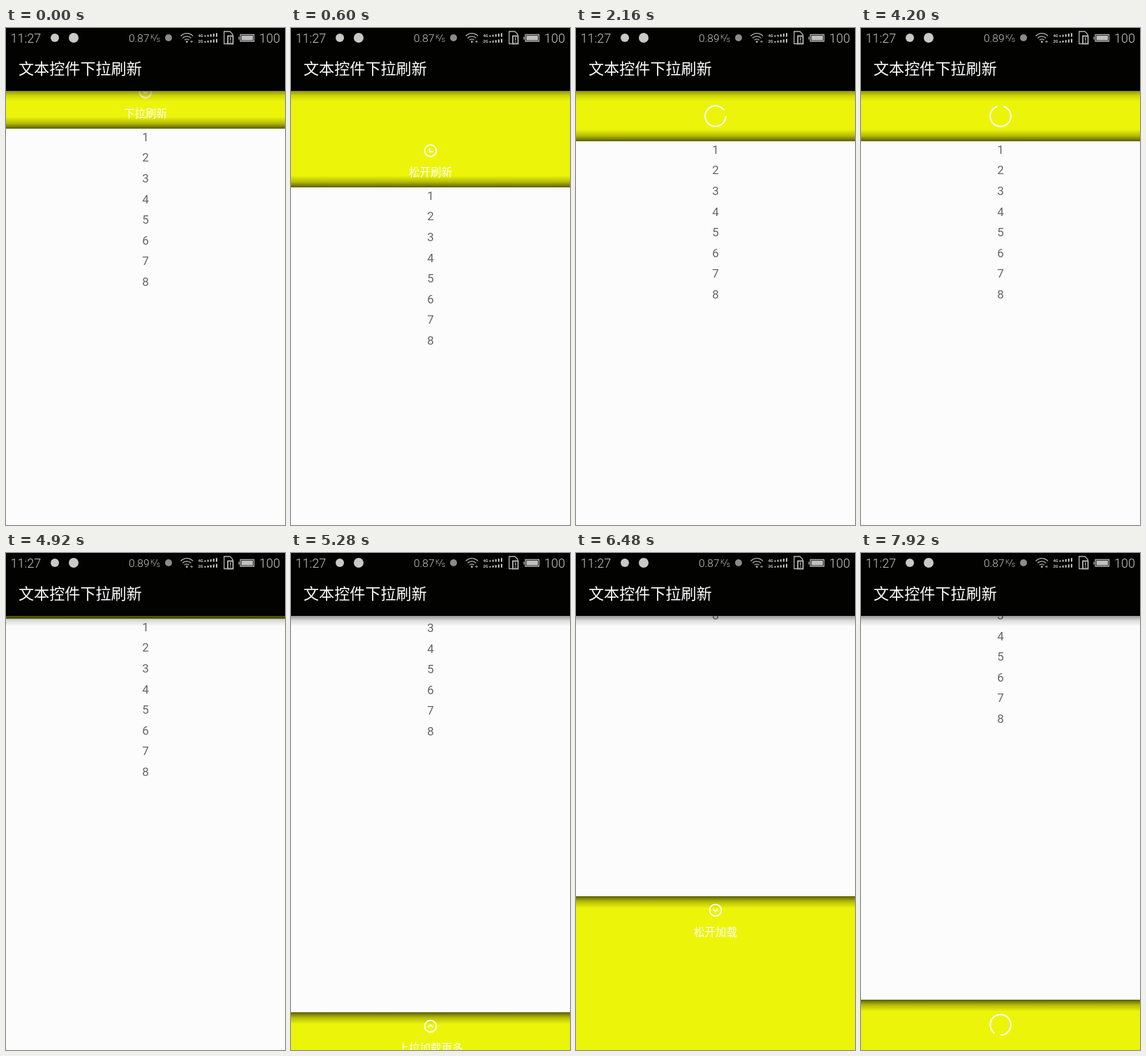
Animation, 400 px wide and 711 px high, one loop 8000 ms. Source, as an HTML page:

```html
<!DOCTYPE html>
<html lang="zh-CN">
<head>
<meta charset="utf-8">
<title>下拉刷新</title>
<style>
  html, body { margin: 0; width: 100%; height: 100%; overflow: hidden; background: #fcfcfc; }
  svg { display: block; width: 100vw; height: 100vh; }
  text { font-family: Roboto, "Noto Sans CJK SC", "Noto Sans CJK", sans-serif; }
  .status { fill: #c9c9c9; font-weight: 300; }
  .line { fill: none; stroke: #b4b4b4; stroke-width: 1.3; }
  .hint { fill: #fff; font-size: 15.5px; text-anchor: middle; }
  .ring { fill: none; stroke: #fff; stroke-width: 1.8; }
  .number { fill: #666; font-size: 17px; text-anchor: middle; }
</style>
</head>
<body>
<svg viewBox="0 0 400 711" preserveAspectRatio="none">
  <defs>
    <linearGradient id="shade" x1="0" y1="0" x2="0" y2="1">
      <stop offset="0" stop-opacity=".62"/>
      <stop offset=".45" stop-opacity=".24"/>
      <stop offset="1" stop-opacity="0"/>
    </linearGradient>
    <linearGradient id="barShade" x1="0" y1="0" x2="0" y2="1">
      <stop offset="0" stop-opacity=".4"/>
      <stop offset=".45" stop-opacity=".13"/>
      <stop offset="1" stop-opacity="0"/>
    </linearGradient>
    <g id="arrow" class="ring">
      <circle r="8.4"/>
      <path d="M-3.6-1.6 0 2 3.6-1.6"/>
    </g>
    <circle id="spinner" class="ring" r="14.8" pathLength="360" stroke-dasharray="324 36" stroke-dashoffset="-18" style="stroke-width:2"/>
  </defs>

  <rect y="90" width="400" height="621" fill="#ecf509"/>
  <g id="page">
    <rect y="90" width="400" height="621" fill="#fcfcfc"/>
    <rect width="400" height="17" fill="url(#shade)" transform="translate(0 90) scale(1 -1)"/>
    <rect y="711" width="400" height="17" fill="url(#shade)"/>
    <g id="numbers"></g>
    <g id="header">
      <g class="idle">
        <g transform="translate(200 37.5)"><use class="turn" href="#arrow"/></g>
        <text class="hint" x="200" y="74"></text>
      </g>
      <g transform="translate(200 54)"><use class="spin" href="#spinner"/></g>
    </g>
    <g id="footer">
      <g class="idle">
        <g transform="translate(200 731)"><use class="turn" href="#arrow"/></g>
        <text class="hint" x="200" y="767.5"></text>
      </g>
      <g transform="translate(200 747)"><use class="spin" href="#spinner"/></g>
    </g>
  </g>
  <rect y="90" width="400" height="15" fill="url(#barShade)"/>

  <rect width="400" height="90" fill="#020200"/>
  <text x="18" y="66.3" font-size="22.1" fill="#fff">文本控件下拉刷新</text>

  <g class="status">
    <text x="6.5" y="21" font-size="18">11:27</text>
    <circle cx="70" cy="14" r="6"/>
    <circle cx="97" cy="14" r="7"/>
    <text id="speed" x="176" y="20" font-size="15.5"></text>
    <text x="207" y="15.5" font-size="9.5">K</text>
    <path class="line" d="M212 19 217 9" style="stroke-width:.9"/>
    <text x="215.7" y="20" font-size="10.5">s</text>
    <circle cx="233" cy="14" r="5" fill="#8c8c8c"/>
    <text x="363" y="21" font-size="18">100</text>
  </g>
  <g class="line">
    <path d="M250.5 11.5a12 12 0 0 1 17.5 0M253.3 14.5a8 8 0 0 1 12 0M256 17.3a4.6 4.6 0 0 1 6.6 0"/>
    <path d="M264 19.5h4M266 17.5v4" style="stroke-width:.8"/>
    <circle cx="259.3" cy="19.8" r=".8"/>
    <path d="M318 22.5H312.7V5H321L325 9V11"/>
    <path d="M318 11.5h7.5v11H318z" style="stroke-width:1.8"/>
    <path d="M321.7 13.5v4.5M321.7 19v1.5"/>
    <path d="M336 9.5h19.5v9.5H336z"/>
    <path d="M334 12.5v4"/>
  </g>
  <rect x="337.5" y="11" width="16.5" height="6.6" fill="#c0c0c0"/>
  <g id="signal" fill="#c9c9c9"></g>
</svg>
<script>
const LOOP = 8000, STEP = 120;
const $ = selector => document.querySelector(selector);
const clamp = v => Math.min(1, Math.max(0, v));

// Page displacement: positive is pulled down, negative is pulled up.
const PULL = [
  [360, 54], [480, 88], [600, 138], [720, 178], [840, 193], [960, 105], [1080, 78], [1200, 72],
  [4560, 72], [4680, 42], [4800, 16], [4920, 4], [5040, 0], [5160, -20], [5280, -54],
  [5640, -54], [5760, -64], [5880, -95], [6000, -157.5], [6120, -195], [6240, -212], [6480, -220],
  [6600, -212], [6720, -132], [6840, -96], [6960, -80], [7080, -74], [7200, -72]
];

function pullAt(t) {
  const next = PULL.findIndex(([time]) => time >= t);
  if (next < 0) return PULL[PULL.length - 1][1];
  if (next === 0) return PULL[0][1];
  const [t0, v0] = PULL[next - 1], [t1, v1] = PULL[next];
  return v0 + (v1 - v0) * (t - t0) / (t1 - t0);
}

function panel(id, options) {
  const find = name => $(`#${id} .${name}`);
  const idle = find('idle'), turn = find('turn'), hint = find('hint'), spin = find('spin');
  const { labels, armed, released, finished, restAngle, gap, gapTime } = options;
  return t => {
    const done = t > finished;
    const fade = done ? 0 : clamp((t - released + STEP / 2) / 300);
    const turned = done ? 0 : clamp((t - armed) / 160);
    hint.textContent = labels[done || t < armed ? 0 : t < released ? 1 : 2];
    idle.setAttribute('opacity', (1 - fade) ** 2);
    turn.setAttribute('transform', `rotate(${restAngle + 180 * turned})`);
    spin.setAttribute('opacity', fade);
    spin.setAttribute('transform', `rotate(${gap + (t - gapTime) * 0.4945})`);
  };
}

const drawHeader = panel('header', {
  labels: ['下拉刷新', '松开刷新', '正在刷新'],
  armed: 560, released: 960, finished: 4560, restAngle: 0, gap: -18, gapTime: 2160
});
const drawFooter = panel('footer', {
  labels: ['上拉加载更多', '松开加载', '正在加载'],
  armed: 5960, released: 6720, finished: LOOP, restAngle: 180, gap: 108, gapTime: 7920
});

$('#numbers').innerHTML = Array.from({ length: 8 }, (_, i) =>
  `<text class="number" x="200" y="${107.6 + i * 29.64}">${i + 1}</text>`).join('');

$('#signal').innerHTML = ['4G', '2G'].map((label, row) => {
  const base = 12.5 + row * 8.3;
  const bars = Array.from({ length: 5 }, (_, i) =>
    `<rect x="${284.5 + i * 4.1}" y="${base - 2 - i * 0.8}" width="2" height="${2 + i * 0.8}"/>`);
  return `<text x="275.5" y="${base}" font-size="5.8" font-weight="700">${label}</text>` + bars.join('');
}).join('');

function draw(now) {
  const t = Math.floor(now % LOOP / STEP) * STEP;
  $('#page').setAttribute('transform', `translate(0 ${pullAt(t)})`);
  $('#speed').textContent = t >= 2160 && t < 5160 ? '0.89' : '0.87';
  drawHeader(t);
  drawFooter(t);
}

const start = performance.now();
function tick() {
  draw(performance.now() - start);
  requestAnimationFrame(tick);
}
tick();
</script>
</body>
</html>
```
